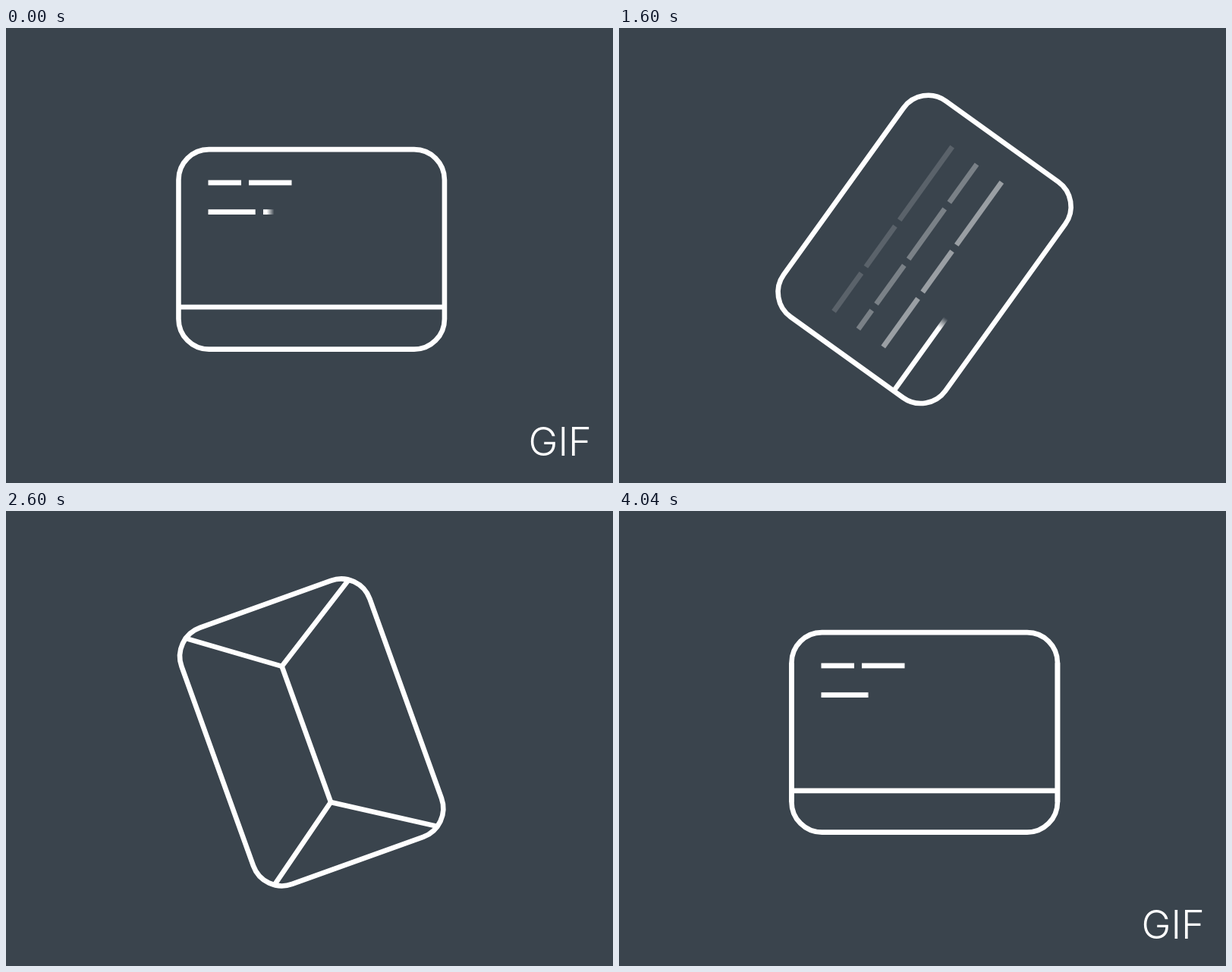
Write an HTML page with a canvas that moves like this. It is 800 by 600 pixels and loops after 4080 ms.

```html
<!DOCTYPE html>
<html lang="en">
<head>
<meta charset="utf-8">
<title>Card to envelope</title>
<style>
  html, body { margin: 0; width: 100%; height: 100%; overflow: hidden; background: #3a444d; }
  canvas, svg { position: absolute; left: 0; top: 0; width: 800px; height: 600px; }
  text { font: 300 52.3px Inter, Lato, sans-serif; fill: #fff; }
</style>
</head>
<body>
<canvas id="stage" width="800" height="600"></canvas>
<svg viewBox="0 0 800 600"><text id="label" x="688.5" y="564">GIF</text></svg>
<script>
const LOOP = 4080, STEP = 40;
const CX = 402.7, CY = 291.9, WIDTH = 350.5, HEIGHT = 263.5, RADIUS = 40;
const LINE = 6.6, LEFT = 266.5, TYPING = 0.425;
const ctx = document.getElementById('stage').getContext('2d');
const label = document.getElementById('label');

const ramp = (t, from, to) => Math.min(1, Math.max(0, (t - from) / (to - from)));
const bell = (t, peak, spread) => Math.exp(-(((t - peak) / spread) ** 2));
function ease(t, from, to, power = 2.3) {
  const s = ramp(t, from, to), a = s ** power;
  return a / (a + (1 - s) ** power);
}

// Text rows: y, typing start, dash ends
const rows = [
  [204, 3730, [LEFT, 310, 320, 376.5]],
  [242.6, 3887, [LEFT, 328.7, 339, 405, 415, 534]],
  [282.4, 4223, [LEFT, 297, 307, 370, 380, 461.5, 472, 534]],
  [322.8, 4560, [LEFT, 345, 355.5, 422, 432, 534]]
];

function path(...points) {
  ctx.beginPath();
  points.forEach(([x, y]) => ctx.lineTo(x, y));
  ctx.stroke();
}

// White up to the front, then a short soft edge
function wipe(front, soft) {
  const g = ctx.createLinearGradient(front - soft, 0, front + soft, 0);
  g.addColorStop(0, '#fff');
  g.addColorStop(1, 'rgba(255,255,255,0)');
  return g;
}

// Rows are typed across the end of the loop, so early times count as the next lap
function drawRows(t) {
  const now = t < 2000 ? t + LOOP : t;
  rows.forEach(([y, start, ends], i) => {
    const front = LEFT + (now - start) * TYPING;
    if (front < LEFT) return;
    const fade = 5280 + 65 * i;
    ctx.globalAlpha = 1 - ramp(now, fade, fade + 400);
    ctx.fillStyle = wipe(front - CX, 5);
    for (let k = 0; k < ends.length; k += 2) {
      ctx.fillRect(ends[k] - CX, y - CY - 3.4, ends[k + 1] - ends[k], 6.8);
    }
  });
  ctx.globalAlpha = 1;
}

function drawDivider(t) {
  ctx.strokeStyle = wipe(t < 1280 ? 200 : 175 - (t - 1280) * 0.75, 8);
  path([-175, 76.1], [175, 76.1]);
  ctx.strokeStyle = '#fff';
}

function drawFolds(t, half, side) {
  const depth = 0.47, spread = depth * ease(t, 2640, 3800);
  const low = -half * (1 - depth * ease(t, 1600, 1900) + spread);
  const high = half * (1 + 0.22 * bell(t, 1920, 70) - depth * ease(t, 1880, 2240) + spread);
  const shift = -77 * ease(t, 2300, 3400) * side * 2 / HEIGHT;

  // The arms meet the frame on its rounded corners, then slide off them
  const a = 34 * Math.PI / 180 * (1 - ease(t, 3280, 3900));
  const end = half - RADIUS * (1 - Math.cos(a));
  const edge = side - RADIUS * (1 - Math.sin(a));
  path([-end, -edge], [low, shift], [-end, edge]);
  if (t > 1740) path([end, -edge], [high, shift], [end, edge]);

  const grow = ramp(t, 1960, 2240);
  if (grow > 0) path([low, shift], [low + (high - low) * grow, shift]);
}

function draw(t) {
  const squeeze = bell(t, 1800, 110);
  const half = (WIDTH + 26 * bell(t, 2540, 90) - 85 * bell(t, 2800, 130)) / 2;
  const side = (HEIGHT - 28 * squeeze + 6.5 * bell(t, 3260, 150)) / 2;
  const turns = ease(t, 1180, 1950) + ease(t, 2000, 3600, 2.48);

  ctx.setTransform(1, 0, 0, 1, 0, 0);
  ctx.fillStyle = '#3a444d';
  ctx.fillRect(0, 0, 800, 600);
  ctx.translate(CX - 2.4 * squeeze, CY);

  ctx.save();
  ctx.rotate(-turns * Math.PI / 2);
  ctx.lineWidth = LINE;
  ctx.strokeStyle = '#fff';
  ctx.beginPath();
  ctx.roundRect(-half, -side, half * 2, side * 2, RADIUS);
  ctx.stroke();
  if (t < 1760) drawDivider(t);
  if (t > 1600) drawFolds(t, half, side);
  if (t < 2000) drawRows(t);
  ctx.restore();
  if (t >= 2000) drawRows(t);

  label.style.opacity = t < 2000 ? 1 - ramp(t, 680, 1080) : ramp(t, 2960, 3920);
}

const begin = performance.now();
function tick() {
  const t = (performance.now() - begin) % LOOP;
  draw(Math.floor(t / STEP) * STEP);
  requestAnimationFrame(tick);
}
tick();
</script>
</body>
</html>
```
